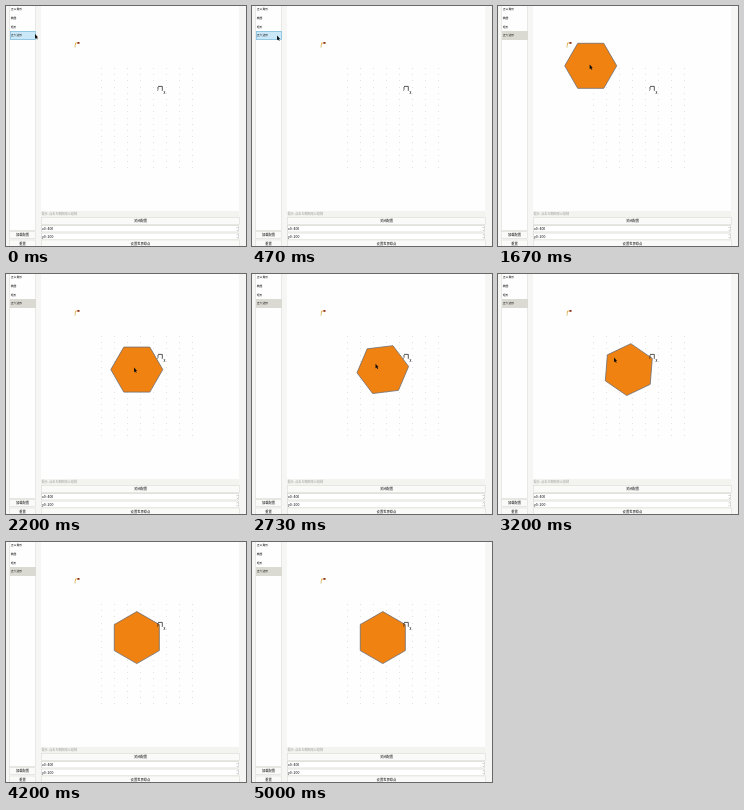
An HTML page with a canvas that plays this animation: 240x240 px, repeating every 5.07 s.

```html
<!DOCTYPE html>
<html lang="zh">
<head>
<meta charset="utf-8">
<title>图形编辑</title>
<style>
html, body { margin: 0; width: 100%; height: 100%; overflow: hidden; background: #fff; }
canvas { display: block; width: 100vw; height: 100vh; }
</style>
</head>
<body>
<canvas id="stage"></canvas>
<script>
const LOOP = 5070, STEP = 200 / 3, SIZE = 240;
const CREATED = 600, GRABBED = 1600, DROPPED = 2130;
const TURN_START = 2400, TURN_END = 3460, LEFT = 4130;
const EDGE = '#dfdfdb', BUTTON = '#fafaf9', RADIUS = 26;
const FONT = '"Noto Sans CJK SC", "Noto Sans CJK", "Noto Sans", sans-serif';

const canvas = document.getElementById('stage');
const ctx = canvas.getContext('2d');

function ease(t, from, to) {
  const u = Math.min(1, Math.max(0, (t - from) / (to - from)));
  return u * u * (3 - 2 * u);
}

function rect(x, y, w, h, fill, edge) {
  ctx.fillStyle = fill;
  ctx.fillRect(x, y, w, h);
  if (!edge) return;
  ctx.strokeStyle = edge;
  ctx.lineWidth = 0.7;
  ctx.strokeRect(x + 0.5, y + 0.5, w - 1, h - 1);
}

function label(text, x, y, size = 3.3, color = '#000', align = 'center') {
  ctx.font = `500 ${size}px ${FONT}`;
  ctx.textAlign = align;
  ctx.textBaseline = 'middle';
  ctx.fillStyle = color;
  ctx.fillText(text, x, y);
}

function line(color, width, ...points) {
  ctx.beginPath();
  points.forEach(([x, y]) => ctx.lineTo(x, y));
  ctx.strokeStyle = color;
  ctx.lineWidth = width;
  ctx.stroke();
}

function button(text, x, y, w) {
  rect(x, y, w, 8, BUTTON, EDGE);
  label(text, x + w / 2, y + 4);
}

function drawSidebar(t) {
  rect(3, -1, 27, 226, '#fefefe', EDGE);
  const focused = t < GRABBED;
  rect(4, 25, 26, 9, focused ? '#cbe8f8' : '#dad9d2', focused ? '#7ebbd9' : '');
  ['正三角形', '椭圆', '矩形', '正六边形'].forEach((text, i) =>
    label(text, 4.8, 3.2 + i * 8.7, 2.8, '#000', 'left'));
  button('加载配置', 3, 225, 27);
  button('重置', 3, 233.5, 27);
}

function drawField(text, y) {
  rect(35, y, 198, 7.5, '#fff', '#d4d4d0');
  label(text, 36, y + 3.9, 3.5, '#000', 'left');
  for (const side of [-1, 1]) {
    const base = y + 3.8 + side;
    line('#777', 0.4, [230.6, base], [231.4, base + side * 0.8], [232.2, base]);
  }
}

function drawForm() {
  rect(35, 205, 198, 6, '#f3f3ef');
  label('提示: 点击左侧图形以绘制', 35.5, 208, 3.1, '#999', 'left');
  button('关闭配置', 35, 211, 199);
  drawField('x0: 400', 219);
  drawField('y0: 200', 226.5);
  button('设置世界原点', 35, 233.5, 199);
}

function drawGrid() {
  ctx.fillStyle = '#e2e2e4';
  for (let x = 95; x < 190; x += 13)
    for (let y = 62; y < 165; y += 6.2) ctx.fillRect(x, Math.round(y), 1, 1);
}

function drawHexagon(t) {
  const drag = ease(t, GRABBED, DROPPED);
  const turn = -Math.PI / 6 * ease(t, TURN_START, TURN_END);
  const x = 91 + 39.8 * drag, y = 58.2 + 37.4 * drag;
  ctx.beginPath();
  for (let i = 0; i < 6; i++) {
    const a = i * Math.PI / 3 + turn;
    ctx.lineTo(x + RADIUS * Math.cos(a), y + RADIUS * Math.sin(a));
  }
  ctx.closePath();
  ctx.fillStyle = '#f08212';
  ctx.fill();
  ctx.strokeStyle = '#6f6c70';
  ctx.lineWidth = 0.8;
  ctx.stroke();
}

function drawAxes() {
  line('#e0a030', 0.8, [69.5, 39], [69.5, 37], [72, 37]);
  rect(71.5, 36, 2, 1.8, '#8a2d17');
  label('y', 69.3, 39.4, 3.6, '#b3a52c');
  line('#444', 0.9, [152, 80.4], [156.3, 80.4], [156.3, 84.8]);
  label('y', 152, 83, 3.8);
  label('x', 158.5, 87, 3.8);
}

// The pointer enters the list, grabs the shape, drags it, turns it and leaves.
function drawCursor(t) {
  const enter = ease(t, 130, 400), reach = ease(t, 1200, 1530);
  const drag = ease(t, GRABBED, DROPPED), turn = ease(t, TURN_START, 3200);
  const leave = ease(t, 3730, LEFT);
  const x = 29 - 4 * enter + 65 * reach + 38 * drag - 12 * turn + 36 * leave;
  const y = 28 + 1.5 * enter + 27.5 * reach + 36.5 * drag - 10 * turn - 1.5 * leave;
  ctx.beginPath();
  ctx.moveTo(x, y);
  ctx.lineTo(x, y + 4.4);
  ctx.lineTo(x + 3, y + 3.2);
  ctx.closePath();
  ctx.fillStyle = '#111';
  ctx.fill();
  line('#111', 0.9, [x + 1.2, y + 3], [x + 2.2, y + 5.2]);
}

function draw(t) {
  ctx.setTransform(canvas.width / SIZE, 0, 0, canvas.height / SIZE, 0, 0);
  rect(0, 0, SIZE, SIZE, '#f6f6f4');
  rect(35, 0, 198, 205, '#fefefe');
  drawSidebar(t);
  drawForm();
  drawGrid();
  if (t >= CREATED) drawHexagon(t);
  drawAxes();
  if (t < LEFT) drawCursor(t);
}

function resize() {
  const ratio = window.devicePixelRatio || 1;
  canvas.width = Math.round(innerWidth * ratio);
  canvas.height = Math.round(innerHeight * ratio);
}

const start = performance.now();
function tick() {
  const t = (performance.now() - start) % LOOP;
  draw(Math.floor((t + 4) / STEP) * STEP);
  requestAnimationFrame(tick);
}

addEventListener('resize', resize);
resize();
tick();
</script>
</body>
</html>
```
